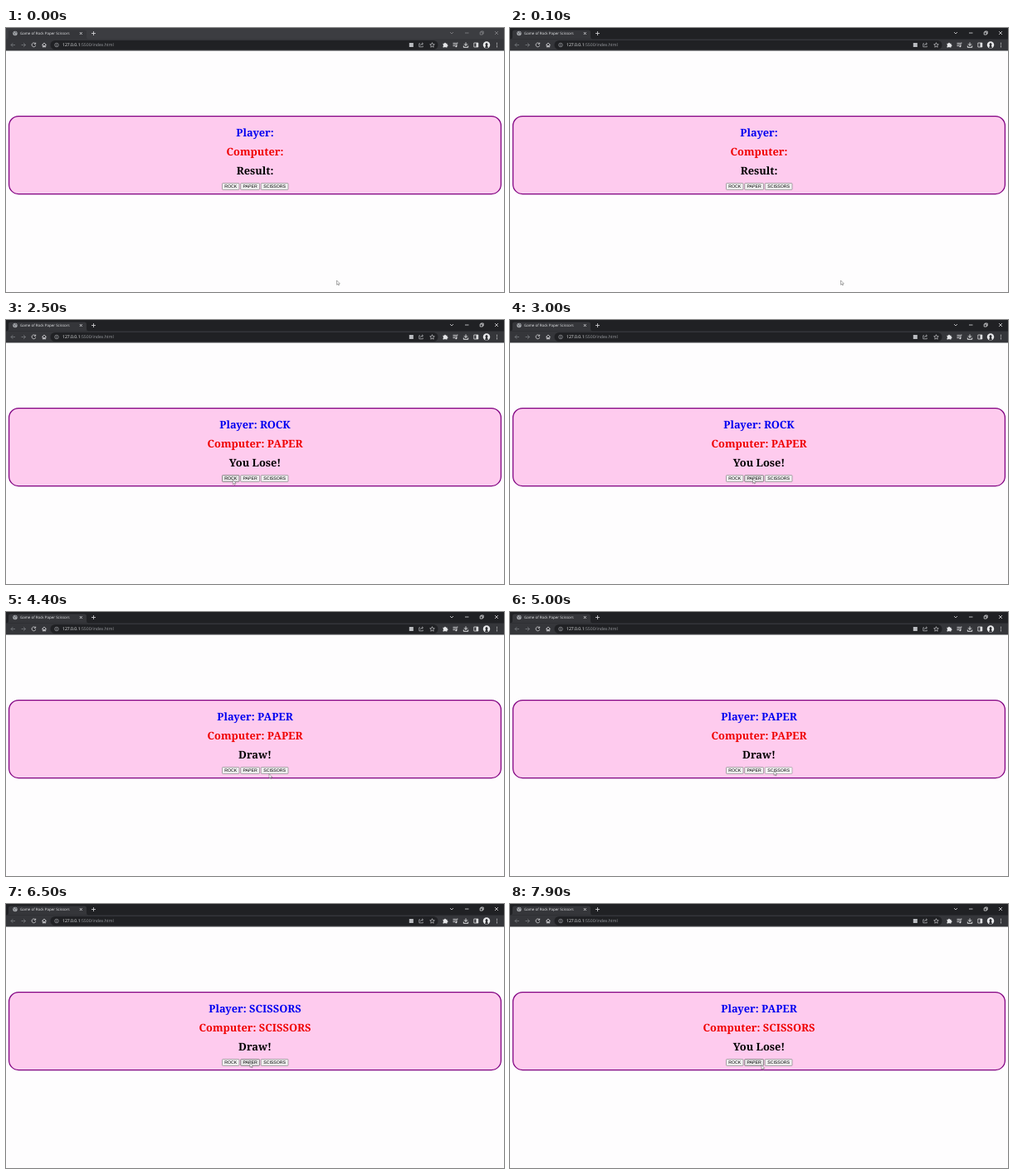
These frames come from a looping animation (600 px wide and 319 px high, 8000 ms). An HTML page:

```html
<!DOCTYPE html>
<html lang="en">
<head>
<meta charset="utf-8">
<title>Game of Rock Paper Scissors</title>
<style>
  html, body { margin: 0; width: 100%; height: 100%; overflow: hidden; background: #fefdfe; }
  svg { display: block; width: 100%; height: 100%; }
  text { text-rendering: geometricPrecision; }
  .ui { font-family: "Open Sans", "Noto Sans", sans-serif; }
  .scores text { font: bold 12.8px "Noto Serif", serif; text-anchor: middle; }
  .buttons text { font: 5.2px "Liberation Sans", Arial, sans-serif; text-anchor: middle; }
  .buttons rect { fill: #efefef; stroke: #767676; stroke-width: .6; }
  .buttons .hover rect { fill: #e5e5e5; stroke: #4f4f4f; }
  .buttons .pressed rect { fill: #f5f5f5; stroke: #8d8d8d; }
  .icon { fill: none; stroke: #e4e5e7; stroke-width: .75; }
  .dim { stroke: #7d7f83; }
  .soft { stroke: #b4b6ba; }
  .solid { fill: #e4e5e7; }
</style>
</head>
<body>
<svg viewBox="0 0 600 319">
  <rect width="600" height="319" fill="#fefdfe"/>

  <!-- Tab strip -->
  <rect id="strip" width="600" height="14"/>
  <path d="M0 13.5Q3 13.5 3 10.5V5Q3 2.5 5.5 2.5H94.500Q97 2.5 97 5V10.5Q97 13.5 100 13.5Z" fill="#35363a"/>
  <circle cx="11" cy="6.5" r="2.7" fill="#aaadb1"/>
  <path d="M9 5.5l1.500 1 .4 2M11 4l.5 1.600 1.800.4" class="icon" style="stroke:#4a4c50"/>
  <text class="ui" x="17" y="8.200" font-size="4.45" fill="#e6e7e9">Game of Rock Paper Scissors</text>
  <path class="icon" d="M88.800 5l3 3m0-3l-3 3M103 6.500h5m-2.500-2.500v5"/>
  <g id="controls" class="icon">
    <path d="M535 5l2 2 2-2M553 6h4.500M589 4l4 4m0-4l-4 4"/>
    <path d="M571.200 5h3v3h-3zM572.200 5v-1h3v3h-1"/>
  </g>

  <!-- Toolbar -->
  <rect y="13.500" width="600" height="14" fill="#35363a"/>
  <rect x="53.500" y="15" width="467" height="11" rx="5.500" fill="#202124"/>
  <path class="icon dim" d="M11 20.500H6m2.400-2.400L6 20.500l2.400 2.400M18.500 20.500h5m-2.400-2.400l2.400 2.400-2.400 2.400"/>
  <path class="icon" d="M35.300 18.800A2.400 2.400 0 1 0 35.800 21M35.700 17.600v1.800h-1.800M43.300 20.500l2.700-2.500 2.700 2.500M44.300 20v3h1.200v-1.700h1V23h1.200v-3"/>
  <circle class="icon soft" cx="61" cy="20.500" r="2.300" style="stroke-width:.6"/>
  <path class="icon soft" d="M61 20.200v1.500M61 19v.6"/>
  <text class="ui" x="68" y="22.300" font-size="5.1" fill="#f1f2f3">127.0.0.1<tspan fill="#999ca0">:5500/index.html</tspan></text>
  <rect x="485.800" y="18" width="5" height="5" fill="#b9bbbf"/>
  <path class="icon soft" d="M499 18.800h-1.200v4h4.500v-1.200M499.300 21.200q.3-2 3-2.200m-1.300-1.300l1.500 1.300-1.500 1.300"/>
  <path class="icon" style="stroke-width:.6" d="M513.500 17.700l.8 1.900 2 .2-1.500 1.400.4 2-1.700-1-1.700 1 .4-2-1.500-1.400 2-.2z"/>
  <path class="solid" d="M526.500 18.800h1.500a1 1 0 0 1 2 0h1.500v1.500a1 1 0 0 1 0 2v1.300h-1.600a1 1 0 0 0-1.900 0h-1.500v-1.600a1 1 0 0 0 0-1.800z"/>
  <path class="icon" d="M538.500 18.300h4m-4 1.700h4m-4 1.700h2.400M543 22.300v-4.200h1.500"/>
  <circle class="solid" cx="542.300" cy="22.300" r="1"/>
  <path class="icon" style="stroke-width:1" d="M554 17.500v3.800m-2-2l2 2 2-2M551.300 21.500v1.800h5.400v-1.800"/>
  <path class="icon" d="M563.800 18h5v5h-5z"/>
  <path class="solid" d="M566.500 18h2.300v5h-2.300z"/>
  <circle cx="579" cy="20.500" r="4.200" fill="#e9eaec"/>
  <path d="M577.200 24.500q0-2.500 1-3.300a1.500 1.700 0 1 1 1.600 0q1 .8 1 3.300z" fill="#303135"/>
  <g class="solid"><circle cx="591.500" cy="18.300" r=".6"/><circle cx="591.500" cy="20.500" r=".6"/><circle cx="591.500" cy="22.700" r=".6"/></g>

  <!-- Game -->
  <rect x="3.600" y="106.600" width="592.800" height="93.900" rx="11.500" fill="#fecbee" stroke="#800080" stroke-width="1.250"/>
  <g class="scores">
    <text id="player" x="300" y="130.800" fill="#0000f0"/>
    <text id="computer" x="300" y="153.800" fill="#f00000"/>
    <text id="result" x="300" y="176.600"/>
  </g>
  <g class="buttons" id="buttons"></g>
  <path id="cursor" d="M0 0V5.300L1.250 4.200 2 6 2.900 5.600 2.150 3.900H3.800Z" fill="#fff" stroke="#333" stroke-width=".4"/>
</svg>
<script>
const LOOP = 8000, STEP = 100;
const byId = id => document.getElementById(id);

const buttons = [
  { label: "ROCK", left: 260.5, right: 281, pressAt: 1500 },
  { label: "PAPER", left: 282.7, right: 305.5 },
  { label: "SCISSORS", left: 307.2, right: 340, pressAt: 5000 }
];
const TOP = 187.6, BOTTOM = 195.4;

// Time, player, computer, result
const rounds = [
  [0, "", "", "Result:"],
  [1600, "ROCK", "PAPER", "You Lose!"],
  [3500, "PAPER", "PAPER", "Draw!"],
  [5100, "SCISSORS", "SCISSORS", "Draw!"],
  [6700, "PAPER", "SCISSORS", "You Lose!"]
];

// Time, x, y of the pointer tip
const path = [
  [0, 398.5, 305], [100, 398.5, 305], [300, 375, 284], [600, 308, 226],
  [900, 271, 195.8], [1000, 269, 192], [2400, 269, 192], [2700, 282, 196],
  [3000, 292.5, 192], [4000, 292.5, 192], [4200, 304, 197], [4400, 317, 195.6],
  [4600, 318, 192], [5900, 318, 192], [6200, 306, 195], [6500, 294, 192],
  [7700, 294, 192], [7900, 303, 194.5], [LOOP, 303, 194.5]
];

byId("buttons").innerHTML = buttons.map(({ label, left, right }) =>
  `<g><rect x="${left}" y="${TOP}" width="${right - left}" height="${BOTTOM - TOP}" rx=".8"/>` +
  `<text x="${(left + right) / 2}" y="193.400">${label}</text></g>`).join("");
const buttonNodes = [...byId("buttons").children];

function pointerAt(time) {
  const next = path.findIndex(key => key[0] > time);
  const [t0, x0, y0] = path[next - 1], [t1, x1, y1] = path[next];
  const k = (time - t0) / (t1 - t0);
  return [x0 + (x1 - x0) * k, y0 + (y1 - y0) * k];
}

function render(time) {
  const active = time >= 100;
  byId("strip").setAttribute("fill", active ? "#202124" : "#3c3d41");
  byId("controls").setAttribute("opacity", active ? 1 : .45);

  const [, player, computer, result] = rounds.findLast(round => round[0] <= time);
  byId("player").textContent = `Player: ${player}`.trim();
  byId("computer").textContent = `Computer: ${computer}`.trim();
  byId("result").textContent = result;

  const [x, y] = pointerAt(time);
  byId("cursor").setAttribute("transform", `translate(${x} ${y})`);
  buttons.forEach(({ left, right, pressAt }, i) => {
    const over = x >= left && x <= right && y >= TOP && y <= BOTTOM;
    buttonNodes[i].setAttribute("class", time === pressAt ? "pressed" : over ? "hover" : "");
  });
}

const start = performance.now();
function tick() {
  const elapsed = (performance.now() - start) % LOOP;
  render(Math.floor(elapsed / STEP) * STEP);
  requestAnimationFrame(tick);
}
tick();
</script>
</body>
</html>
```
